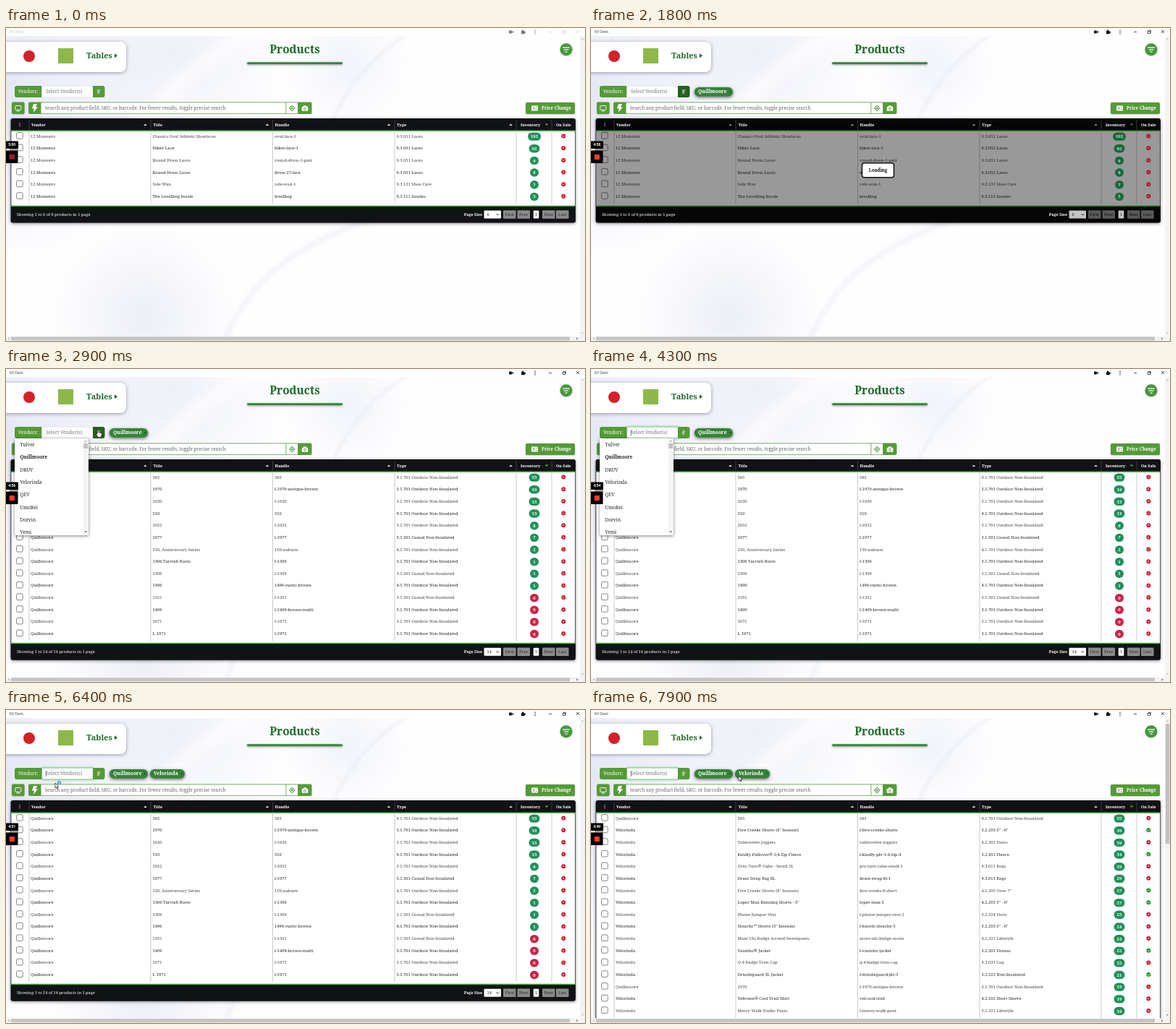
These frames come from a looping animation (800 by 433 pixels, 8 s). An HTML page with a canvas:

```html
<!DOCTYPE html>
<html lang="en">
<head>
<meta charset="utf-8">
<title>Products</title>
<style>
html, body { margin: 0; width: 100%; height: 100%; overflow: hidden; background: #fff; }
canvas { display: block; width: 800px; height: 433px; }
</style>
</head>
<body>
<canvas id="stage"></canvas>
<script>
const W = 800, H = 433, LOOP = 8000;
const SERIF = '"Noto Serif", serif', SANS = '"Open Sans", sans-serif';
const GREEN = '#559a38', DEEP = '#1d6a28', INK = '#111214', ROW = 16.65, TOP = 125;
const dpr = window.devicePixelRatio || 1;
const canvas = document.getElementById('stage');
canvas.width = W * dpr;
canvas.height = H * dpr;
const c = canvas.getContext('2d');

// ---- data: title|handle|type|stock|on sale
const FIRST = 'Quillmoore', SECOND = 'Velorinda';
const VENDORS = ['Tulver', FIRST, 'DRUV', SECOND, 'QEV', 'UmoRei', 'Dorvin', 'Vemi'];
const MATCHES = [SECOND, 'Velusk Place', 'Tarvel Outlander Gear'];
const OUT = 'Outdoor Non-Insulated', CAS = 'Casual Non-Insulated';

const parse = (vendor, lines) => lines.trim().split('\n').map(line => {
  const [title, handle, type, stock, sale] = line.trim().split('|');
  return { vendor, title, handle, type: type.replace('OUT', OUT).replace('CAS', CAS), stock, sale };
});

const laces = parse('12 Moments', `
  Classics Oval Athletic Shoelaces|oval-lace-1|9.3.051 Laces|192
  Hiker Lace|hiker-lace-1|9.3.051 Laces|92
  Round Dress Laces|round-dress-1-pair|9.3.051 Laces|9
  Round Dress Laces|dress-27-lace|9.3.051 Laces|8
  Sole Wax|sole-wax-1|9.3.131 Shoe Care|7
  The Levelling Insole|levelling|9.3.111 Insoles|5`);

const boots = parse(FIRST, `
  585|585|9.1.701 OUT|55
  1970|l-1970-antique-brown|5.1.701 OUT|19
  1630|l-1630|5.1.701 OUT|15
  510|510|9.1.701 OUT|13
  2052|l-2052|5.1.701 OUT|8
  1977|l-1977|5.1.501 CAS|7
  150, Anniversary Series|150-auburn|4.1.701 OUT|2
  1306 Tarvish Boots|l-1306|5.1.701 OUT|1
  1309|l-1309|5.1.501 CAS|1
  1496|1496-rustic-brown|4.1.701 OUT|1
  1351|l-1351|5.1.501 CAS|0
  1409|l-1409-brown-multi|5.1.701 OUT|0
  1671|l-1671|5.1.701 OUT|0
  L 1971|l-1971|5.1.701 OUT|0`);

const mixed = parse(SECOND, `
  Five Creeks Shorts (6" Inseam)|l-five-creeks-shorts|5.2.203 5" - 6"|39|y
  Valmorette Joggers|valmorette-joggers|4.2.302 Pants|39
  Kindly Pullover® 1/4-Zip Fleece|l-kindly-plv-1-4-zip-4|5.2.451 Fleece|34|y
  Grey Tarn® Cube - Small 3L|gry-tarn-cube-small-1|9.3.011 Bags|33
  Dram Strap Bag 8L|dram-strap-8l-1|9.3.011 Bags|29
  Five Creeks Shorts (8" Inseam)|five-creeks-8-short|4.2.205 Over 7"|27|y
  Loper Max Running Shorts - 5"|loper-max-5|4.2.203 5" - 6"|27|y
  Plume Jumper Vest|l-plume-jumper-vest-1|5.2.524 Vests|25
  Slouchy™ Shorts (5" Inseam)|l-barely-slouchy-5|5.2.203 5" - 6"|24
  Mont Ulo Badge Ascend Sweatpants|mont-ulo-badge-ascen|4.2.321 Lifestyle|24
  Vanisho® Jacket|l-vanisho-jacket|5.2.501 Fitness|22|y
  Q-4 Badge Trim Cap|q-4-badge-trim-cap|9.3.031 Cap|22
  Drizzleguard 3L Jacket|l-drizzleguard-jkt-3|5.2.523 Non-Insulated|21|y
  Veltrane® Cool Trail Shirt|vel-cool-trail|4.2.102 Short Sleeve|19
  Merry Walk Studio Pants|l-merry-walk-pant|5.2.321 Lifestyle|18`);
mixed.unshift(boots[0]);
mixed.splice(14, 0, boots[1]);

// ---- drawing helpers
function text(s, x, cy, size, color, { bold, align = 'left', font = SERIF } = {}) {
  c.font = `${bold ? 'bold ' : ''}${size}px ${font}`;
  c.textAlign = align;
  c.fillStyle = color;
  c.fillText(s, x, cy + size * 0.35);
}
function rect(x, y, w, h, color) { c.fillStyle = color; c.fillRect(x, y, w, h); }
function box(x, y, w, h, r, color, stroke, lw = 1) {
  c.beginPath();
  c.roundRect(x, y, w, h, r);
  if (color) { c.fillStyle = color; c.fill(); }
  if (stroke) { c.strokeStyle = stroke; c.lineWidth = lw; c.stroke(); }
}
function dot(x, y, r, color) {
  c.beginPath(); c.arc(x, y, r, 0, 7); c.fillStyle = color; c.fill();
}
function ring(x, y, r, color, lw) {
  c.beginPath(); c.arc(x, y, r, 0, 7); c.strokeStyle = color; c.lineWidth = lw; c.stroke();
}
function trace(p) {
  c.beginPath();
  for (let i = 0; i < p.length; i += 2) c.lineTo(p[i], p[i + 1]);
}
function line(p, color, lw = 1) {
  trace(p); c.strokeStyle = color; c.lineWidth = lw; c.stroke();
}
function poly(p, color) { trace(p); c.closePath(); c.fillStyle = color; c.fill(); }
function shadowed(color, blur, dy, draw) {
  c.save();
  c.shadowColor = color; c.shadowBlur = blur * dpr; c.shadowOffsetY = dy * dpr;
  draw();
  c.restore();
}
function tri(x, y, r, color, dir = -1) {
  poly([x - r, y - dir * r / 2, x + r, y - dir * r / 2, x, y + dir * r / 2], color);
}

// ---- soft swoosh backdrop, painted once
const backdrop = document.createElement('canvas');
backdrop.width = W; backdrop.height = H;
(function paintBackdrop() {
  const b = backdrop.getContext('2d');
  b.fillStyle = '#fefeff';
  b.fillRect(0, 0, W, H);
  const glow = (x, y, r, rgb, a) => {
    const g = b.createRadialGradient(x, y, 0, x, y, r);
    g.addColorStop(0, `rgba(${rgb},${a})`);
    g.addColorStop(1, `rgba(${rgb},0)`);
    b.fillStyle = g;
    b.fillRect(0, 0, W, H);
  };
  glow(0, 90, 230, '208,214,236', 0.55);
  glow(230, 30, 160, '214,219,238', 0.4);
  glow(470, 50, 90, '224,228,243', 0.4);
  glow(190, 400, 130, '212,216,232', 0.4);
  const sweep = (p, color, lw, blur) => {
    b.filter = `blur(${blur}px)`;
    b.strokeStyle = color;
    b.lineWidth = lw;
    b.beginPath();
    b.moveTo(p[0], p[1]);
    b.bezierCurveTo(...p.slice(2));
    b.stroke();
  };
  sweep([345, 5, 290, 30, 230, 80, 185, 135], 'rgba(255,255,255,.6)', 22, 8);
  sweep([560, 5, 510, 35, 475, 75, 450, 130], 'rgba(226,229,242,.6)', 3, 2);
  sweep([510, 262, 400, 300, 330, 350, 300, 440], 'rgba(226,229,241,.7)', 4, 3);
  b.filter = 'none';
})();

// ---- page parts
function titleBar(focused) {
  const ink = focused ? '#111' : '#d2d2d2';
  const mid = focused ? '#111' : '#777';
  rect(0, 0, W, 11, '#fff');
  text('KV Deck', 5, 5.4, 5, focused ? '#333' : '#bbb', { font: SANS });
  box(695, 3.5, 4, 4, 0.8, mid);
  poly([699, 5.5, 701, 3.8, 701, 7.2], mid);
  box(712, 4, 4.6, 4.2, 0.5, mid);
  dot(714, 3.6, 1.1, mid);
  dot(717, 6, 1, mid);
  for (const y of [3.2, 5.5, 7.8]) dot(731, y, 0.7, mid);
  line([750, 5.5, 754, 5.5], ink, 0.7);
  c.strokeStyle = ink;
  c.strokeRect(769.3, 4.3, 3.3, 3.3);
  line([770.3, 4, 770.3, 3.2, 773.5, 3.2, 773.5, 6.5], ink, 0.6);
  line([788, 3, 792, 7], ink, 0.7);
  line([792, 3, 788, 7], ink, 0.7);
}

function header() {
  shadowed('rgba(60,60,90,.5)', 5, 1, () => box(-8, 19, 174, 42, 8, '#fff'));
  dot(32, 39, 8, '#d3222a');
  rect(72, 28, 21, 21, '#8db849');
  text('Tables', 111, 38, 10.9, DEEP, { bold: true });
  poly([150, 35.3, 154, 38.3, 150, 41.3], DEEP);
  text('Products', 399, 29.7, 15.4, DEEP, { bold: true, align: 'center' });
  shadowed('rgba(0,0,0,.45)', 3, 1, () => box(333, 47.2, 132, 2.8, 1.4, '#2f8a34'));
  shadowed('rgba(0,0,0,.3)', 2, 0.5, () => dot(774, 29.8, 8.5, '#45983a'));
  [[5, 27], [3.4, 30], [1.6, 33]].forEach(([w, y]) => line([774 - w, y, 774 + w, y], '#fff', 1.2));
}

function pill(name, x, w) {
  shadowed('rgba(0,0,0,.6)', 4, 1.5, () => box(x, 82, w, 12.5, 6.2, '#348336'));
  text(name, x + 5, 88, 6.8, '#fff', { bold: true });
  line([x + w - 5, 87, x + w - 3, 89], '#1b4d1e', 0.7);
  line([x + w - 3, 87, x + w - 5, 89], '#1b4d1e', 0.7);
}

function vendorBar(s) {
  box(12, 80, 37.5, 16, [3, 0, 0, 3], GREEN);
  text('Vendors:', 17, 88, 6.5, '#fff');
  if (s.typing) {
    shadowed('rgba(60,170,70,.5)', 3, 0, () => box(49.5, 80, 71, 16, 0, '#fff', '#6dbb70', 0.7));
  } else {
    box(49.5, 80.3, 71, 15.4, 0, '#fff', '#d9dce6', 0.6);
  }
  if (s.query) text(s.query, 55, 88, 6.6, '#333');
  else text('Select Vendor(s)', 55, 88, 6.6, '#70757a');
  if (s.typing && !s.query) line([55.3, 84, 55.3, 92], '#222', 0.6);
  box(120, 80, 16.5, 16, [0, 3, 3, 0], s.pressed ? '#25601f' : GREEN);
  for (let i = 0; i < 4; i++) line([126, 85.8 + i * 1.5, 130.4 - i * 0.5, 85.8 + i * 1.5], '#e9f4e4', 0.8);
  if (s.pills > 0) pill(FIRST, 143, 53);
  if (s.pills > 1) pill(SECOND, 199, 48);
}

function searchBar() {
  shadowed('rgba(0,0,0,.3)', 2, 0.5, () => {
    box(8, 102.5, 17.5, 16.5, 2, GREEN);
    box(718, 103, 68, 16, 2, GREEN);
  });
  box(12.8, 107.5, 8, 5.8, 0.8, null, '#fff', 0.9);
  line([14.5, 115, 19, 115], '#fff', 0.9);
  box(31, 102.5, 391.5, 16.5, 2, GREEN);
  poly([38, 105, 43, 105, 41, 109.5, 44, 109.5, 37.5, 117, 39, 111.5, 36, 111.5], '#fff');
  rect(48.5, 103.3, 338, 15, '#fff');
  rect(387.3, 103.3, 15.8, 15, '#fff');
  text('Search any product field, SKU, or barcode. For fewer results, toggle precise search', 53.5, 111, 6.45, '#62666b');
  ring(395.3, 111, 2.9, '#3f8a34', 0.9);
  dot(395.3, 111, 1.2, '#3f8a34');
  for (const [x, y] of [[1, 0], [-1, 0], [0, 1], [0, -1]])
    line([395.3 + x * 3, 111 + y * 3, 395.3 + x * 4.4, 111 + y * 4.4], '#3f8a34', 0.9);
  box(408.7, 108.8, 8.6, 6, 1, '#fff');
  box(411, 107.3, 4, 3, 0.6, '#fff');
  ring(413, 111.8, 1.5, GREEN, 0.8);
  box(726, 107.5, 9, 7, 0.8, '#fff');
  text('$', 728, 111, 5, GREEN, { bold: true });
  rect(731.5, 109.3, 2.5, 0.7, GREEN);
  rect(731.5, 112, 2.5, 0.7, GREEN);
  text('Price Change', 740, 110.8, 6.2, '#fff', { bold: true });
}

const SPLITS = [32, 200, 368.5, 537, 705, 754];
const rowY = i => 149.6 + i * ROW;

function tableRow(r, i) {
  const y = rowY(i), ink = i % 2 ? '#242424' : '#424242';
  box(14.6, y - 5.1, 8.6, 8.6, 1.6, '#fff', '#666', 0.8);
  [r.vendor, r.title, r.handle, r.type].forEach((s, k) =>
    text(s, [34, 202.5, 371, 539.5][k], y, 5.85, ink));
}

function badges(r, i, dim) {
  const y = rowY(i), w = 9 + 3 * r.stock.length;
  const green = dim ? '#17693c' : '#21915a', red = dim ? '#97132f' : '#c92549';
  box(730 - w / 2, y - 5.2, w, 11.4, 5.7, r.stock === '0' ? red : green);
  text(r.stock, 730, y + 0.5, 6.1, dim ? '#e4e4e4' : '#fff', { bold: true, align: 'center' });
  dot(770.3, y, 3, r.sale ? '#1f9a2e' : dim ? '#b01226' : '#d5152c');
  const mark = dim ? '#c9a0a4' : '#fff';
  if (r.sale) line([768.9, y, 770, y + 1.1, 771.8, y - 1], mark, 0.7);
  else {
    line([769.3, y - 1, 771.3, y + 1], mark, 0.7);
    line([771.3, y - 1, 769.3, y + 1], mark, 0.7);
  }
}

function pager(n, y, dim) {
  const paper = dim ? '#c4c4c4' : '#fff', gray = dim ? '#5a5a5a' : '#8b8b8b', ink = dim ? '#111' : '#2b2b2b';
  text(`Showing 1 to ${n} of ${n} products in 1 page`, 15, y, 5.65, '#fff');
  text('Page Size', 658, y, 5.4, '#fff', { bold: true, align: 'right' });
  box(660.5, y - 5.5, 23.5, 11, 1, paper);
  text(n, 664.5, y, 5.6, '#222');
  line([677.5, y - 0.8, 679.3, y + 1, 681.1, y - 0.8], '#111', 0.9);
  [['First', 687], ['Prev', 706.5], ['Next', 741], ['Last', 760]].forEach(([s, x]) => {
    box(x, y - 5.7, 17.5, 11.4, 1, gray);
    text(s, x + 8.75, y, 5.7, ink, { align: 'center' });
  });
  box(728.7, y - 5.5, 7.6, 11, 1, paper);
  text('1', 732.5, y, 5.6, '#222', { align: 'center' });
}

function table(rows, loading) {
  const end = 142.5 + rows.length * ROW + 3.6, bottom = end + 23.5;
  shadowed('rgba(20,20,40,.5)', 4, 1, () => box(6.5, TOP, 780.5, bottom - TOP, 3, loading ? '#060607' : INK));
  rect(7.3, 142, 779, end - 142, '#fff');
  for (const x of SPLITS) {
    line([x, TOP + 2, x, 140.5], '#56585c', 0.6);
    line([x, 143.5, x, end - 3], '#b9bcc2', 0.8);
  }
  rows.forEach(tableRow);
  if (loading) rect(7.3, 142, 779, end - 142, 'rgba(0,0,0,.4)');
  rows.forEach((r, i) => badges(r, i, loading));
  const edge = loading ? '#2c7a30' : '#44b045';
  rect(7, 141.4, 779.6, 1.5, edge);
  rect(7, end - 0.5, 779.6, 1.5, edge);
  for (let i = 0; i < 3; i++) dot(19, 131.6 + i * 2, 0.6, '#fff');
  [['Vendor', 35], ['Title', 203.5], ['Handle', 371.5], ['Type', 540], ['Inventory', 711], ['On Sale', 760]]
    .forEach(([s, x]) => text(s, x, 133.7, 5.4, '#fff', { bold: true }));
  for (const x of [192.5, 361, 529, 697.5]) tri(x, 133.8, 2.4, loading ? '#8a8a8a' : '#d5d5d5');
  tri(747, 133.8, 2.4, loading ? '#3d7a28' : '#5fae3c', 1);
  pager(rows.length, end + 12, loading);
  if (loading) {
    const mid = (TOP + bottom) / 2 - 0.6;
    box(374.5, mid - 10, 44, 20, 3, '#fff', '#111', 1.5);
    text('Loading', 396.5, mid, 6.2, '#111', { bold: true, align: 'center' });
  }
}

function dropdown(s) {
  const short = s.query.length > 1;
  const list = short ? MATCHES : VENDORS;
  const w = short ? 88 : 102, h = short ? 53 : 134;
  shadowed('rgba(0,0,0,.5)', 4, 1, () => rect(12, 96, w, h, '#fff'));
  c.save();
  c.beginPath(); c.rect(12, 96, w, h); c.clip();
  list.forEach((name, i) =>
    text(name, 19.5, 104.7 + i * 17.35, 6.5, '#222', { bold: s.pills > 0 && name === FIRST }));
  c.restore();
  if (short) return;
  rect(106.5, 96, 7.5, h, '#f4f4f4');
  rect(107.2, 103, 6, 7, '#c1c1c1');
  tri(110.2, 99.6, 1.6, '#999');
  tri(110.2, 225.3, 1.8, '#444', 1);
}

function scrollbars(tall) {
  rect(793, 11, 7, 422, '#f3f3f3');
  tri(796.5, 15, 1.4, '#a0a0a0');
  tri(796.5, 422, 1.4, tall ? '#555' : '#a0a0a0', 1);
  if (tall) rect(793.8, 19, 5.6, 166, '#c1c1c1');
  rect(0, 426.5, W, 6.5, '#f3f3f3');
  rect(7, 427.2, 772, 5, '#c4c4c4');
  poly([4.6, 428.3, 4.6, 431.3, 2.8, 429.8], '#a0a0a0');
  poly([788.5, 428.3, 788.5, 431.3, 790.3, 429.8], '#444');
}

function recorder(t) {
  const left = 300 - Math.floor((t + 190) / 720);
  const label = `${Math.floor(left / 60)}:${String(left % 60).padStart(2, '0')}`;
  box(-2, 156.5, 19, 10.5, 1, '#000');
  text(label, 8.2, 161.7, 5, '#fff', { bold: true, align: 'center', font: SANS });
  rect(0, 167, 17, 2.5, '#9a9a9a');
  rect(0, 167, 5, 2.5, '#fff');
  box(-2, 169.5, 18.5, 17.5, 1, '#000');
  if (t < 600) for (let i = 0; i < 3; i++) rect(5 + i * 2.5, 175, 1.7, 6.5, '#e0263a');
  else rect(4.8, 175, 7, 7, '#ff3b26');
}

// ---- pointer
const ARROW = [0, 0, 0, 7, 1.7, 5.5, 2.8, 7.9, 3.8, 7.4, 2.7, 5.2, 4.9, 5.2];
const HAND = [1.6, 0, 2.9, 0.4, 3, 3.8, 6.6, 4.6, 7.4, 5.6, 6.8, 8.2, 6, 10.6, 2.4, 10.6, 0, 7.2, -1, 5.6, 0.2, 5.2, 1.2, 6.2, 1.1, 0.5];

function pointer(x, y, kind) {
  c.save();
  c.translate(x, y);
  trace(kind === 'hand' ? HAND : ARROW);
  c.closePath();
  c.fillStyle = '#fff'; c.fill();
  c.strokeStyle = '#111'; c.lineWidth = 0.7; c.lineJoin = 'round'; c.stroke();
  if (kind === 'busy') ring(5.4, -0.5, 1.9, '#2b8fd0', 1.4);
  c.restore();
}

// each leg: start, end, from x, y, to x, y, kind
const LEGS = [
  [800, 1000, 180, 130, 125, 84, 'arrow'],
  [1000, 1200, 125, 84, 125, 84, 'hand'],
  [1200, 1600, 125, 84, 60, 119, 'hand'],
  [2500, 2800, 150, 120, 125, 84, 'arrow'],
  [2800, 3300, 125, 84, 125, 84, 'hand'],
  [3300, 3600, 125, 84, 95, 85, 'hand'],
  [5600, 5900, 90, 88, 68, 101, 'hand'],
  [5900, 6400, 68, 101, 68, 101, 'hand'],
  [6400, 7000, 68, 101, 219.5, 51, 'busy'],
  [7000, 7500, 219.5, 51, 219.5, 51, 'busy'],
  [7500, 7800, 219.5, 51, 204, 91, 'arrow'],
  [7800, 8000, 204, 91, 204, 91, 'arrow'],
];

function drawPointer(t) {
  const leg = LEGS.find(l => t >= l[0] && t < l[1]);
  if (!leg) return;
  const [a, b, x0, y0, x1, y1, kind] = leg;
  const u = (t - a) / (b - a), e = u * u * (3 - 2 * u);
  pointer(x0 + (x1 - x0) * e, y0 + (y1 - y0) * e, kind);
}

// ---- timeline
const within = (t, a, b) => t >= a && t < b;

function stateAt(t) {
  const typed = t < 6400 ? Math.max(0, Math.min(4, Math.floor((t - 4500) / 220))) : 0;
  return {
    focused: t >= 1000,
    pressed: within(t, 1000, 3600),
    typing: t >= 3700,
    query: 'velo'.slice(0, typed),
    pills: t < 1600 ? 0 : t < 6400 ? 1 : 2,
    open: within(t, 1100, 1600) || within(t, 2800, 6400),
    rows: t < 2200 ? laces : t < 7600 ? boots : mixed,
    loading: within(t, 1700, 2200) || within(t, 6500, 7600),
  };
}

function draw(now) {
  const t = Math.floor(now % LOOP / 100) * 100;
  const s = stateAt(t);
  c.setTransform(dpr, 0, 0, dpr, 0, 0);
  c.textBaseline = 'alphabetic';
  c.drawImage(backdrop, 0, 0, W, H);
  header();
  vendorBar(s);
  searchBar();
  table(s.rows, s.loading);
  if (s.open) dropdown(s);
  scrollbars(s.rows === mixed);
  titleBar(s.focused);
  recorder(t);
  drawPointer(t);
}

const start = performance.now();
function tick() {
  draw(performance.now() - start);
  requestAnimationFrame(tick);
}
tick();
</script>
</body>
</html>
```
